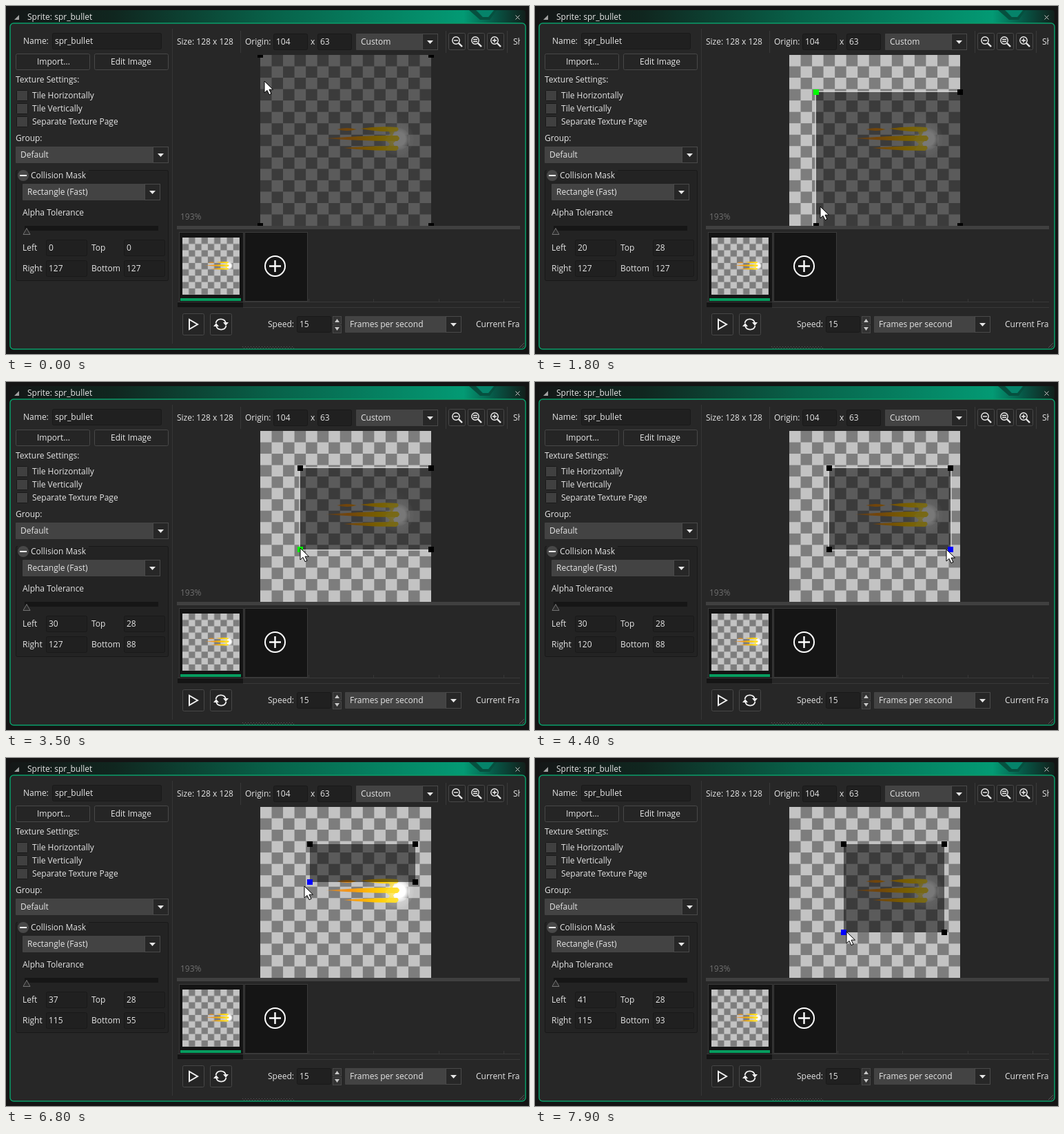
An HTML page for the animation above (8 s loop, 759x505 px).

```html
<!DOCTYPE html>
<html lang="en">
<head>
<meta charset="utf-8">
<title>Sprite editor</title>
<style>
html, body { margin: 0; width: 100%; height: 100%; overflow: hidden; background: #141414; }
svg { display: block; width: 759px; height: 505px; }
text { font: 12px "Open Sans", "Noto Sans", sans-serif; fill: #e6e6e6; white-space: pre; }
</style>
</head>
<body>
<svg id="stage" viewBox="0 0 759 505">
  <defs>
    <linearGradient id="title">
      <stop offset="0" stop-color="#141717"/><stop offset=".2" stop-color="#10261f"/>
      <stop offset=".5" stop-color="#086048"/><stop offset=".88" stop-color="#039a74"/>
      <stop offset=".94" stop-color="#075646"/><stop offset="1" stop-color="#121f1b"/>
    </linearGradient>
    <linearGradient id="flame" gradientUnits="userSpaceOnUse" x1="95" x2="205">
      <stop offset="0" stop-color="#f08a10" stop-opacity=".5"/><stop offset=".3" stop-color="#f59314"/>
      <stop offset=".7" stop-color="#ffcb00"/><stop offset="1" stop-color="#ffe640"/>
    </linearGradient>
    <radialGradient id="glow">
      <stop offset="0" stop-color="#fff" stop-opacity=".8"/><stop offset=".55" stop-color="#fff" stop-opacity=".4"/>
      <stop offset="1" stop-color="#fff" stop-opacity=".08"/>
    </radialGradient>
    <radialGradient id="head">
      <stop offset=".6" stop-color="#fff"/><stop offset="1" stop-color="#fff" stop-opacity=".2"/>
    </radialGradient>
    <pattern id="check" width="2" height="2" patternUnits="userSpaceOnUse">
      <path d="M0 0h2v2H0z" fill="#c3c3c3"/><path d="M1 0h1v1H0v1h1z" fill="#7d7d7d"/>
    </pattern>
    <pattern id="dots" x="343" y="494" width="4" height="4" patternUnits="userSpaceOnUse">
      <path d="M0 0h1v1H0zM2 2h1v1H2z" fill="#5a5a5a"/>
    </pattern>
    <clipPath id="canvasClip"><path d="M249 71h497v248H249z"/></clipPath>
    <clipPath id="imageClip"><path d="M369 71h248v248H369z"/></clipPath>
    <clipPath id="panelClip"><path d="M248 30h498v460H248z"/></clipPath>
    <g id="bullet">
      <circle cx="188" cy="120" r="34" fill="url(#glow)" opacity=".25"/>
      <circle cx="199" cy="122" r="24" fill="url(#glow)" opacity=".5"/>
      <circle cx="201" cy="122" r="16" fill="url(#head)"/>
      <path d="M111 108q14-4 29 0q-14 4-29 0zM145 107q25-4 54-2q4 4-2 6q-28 1-52-4zM95 121q50-4 104-4q6 4 0 8q-56 0-104-4zM121 135q35-3 78-3q4 4-2 7q-42 0-76-4z" fill="url(#flame)"/>
      <path d="M184 106l12 2-4 9 9 4-8 7 3 9-14 1 6-9-7-6 8-7z" fill="#ffe030" opacity=".7"/>
    </g>
  </defs>
  <g id="ui"></g>
  <g clip-path="url(#imageClip)">
    <use href="#bullet" x="369" y="71"/>
    <rect id="edge" fill="none" stroke="#d0d0d0" stroke-width="2" opacity=".7"/>
  </g>
  <g clip-path="url(#canvasClip)">
    <rect id="mask" opacity=".53"/>
    <g id="handles"></g>
  </g>
  <path id="cursor" d="M0 0v17l4-3.6 3 6.3 3-1.4-3-6.1h5.5z" fill="#fff" stroke="#000"/>
</svg>
<script>
const $ = id => document.getElementById(id);
const ui = [];
const rect = (x, y, w, h, fill, stroke = 'none', r = 0) =>
  ui.push(`<rect x="${x}" y="${y}" width="${w}" height="${h}" rx="${r}" fill="${fill}" stroke="${stroke}"/>`);
const path = (d, stroke, fill = 'none', width = 1) =>
  ui.push(`<path d="${d}" stroke="${stroke}" fill="${fill}" stroke-width="${width}"/>`);
const label = (x, y, text, id = '', fill = '#e6e6e6') =>
  ui.push(`<text x="${x}" y="${y}" id="${id}" style="fill:${fill}">${text}</text>`);
const field = (x, y, w, h, text, id) => {
  rect(x + .5, y + .5, w - 1, h - 1, '#202020', '#191919', 2);
  label(x + 4, y + h / 2 + 4, text, id);
};
const button = (x, y, w, h) => rect(x + .5, y + .5, w - 1, h - 1, '#252525', '#484848', 2);
const dropdown = (x, y, w, h, text) => {
  rect(x, y, w, h, '#434343', 'none', 1);
  rect(x + w - 22.5, y + .5, 22, h - 1, '#272727', '#4a4a4a');
  path(`M${x + w - 16} ${y + h / 2 - 2}h9l-4.5 5z`, 'none', '#e6e6e6');
  label(x + 7, y + h / 2 + 4, text);
};
// Checkerboard square with an odd number of cells per side
const checker = (x, y, size, cells) =>
  ui.push(`<rect width="${cells}" height="${cells}" fill="url(#check)" transform="translate(${x} ${y}) scale(${size / cells})"/>`);

function drawWindow() {
  rect(6, 6, 748, 20, 'url(#title)', 'none', 4);
  path('M672 6h10l10 10h8l9-10h3l-10 14H688z', 'none', '#06503f');
  path('M683 6h25l-8 10h-8z', 'none', '#05836a');
  ui.push('<rect x="6" y="25" width="748" height="473" rx="5" fill="#272727" stroke="#0a9d69" stroke-width="1.5"/>');
  path('M12 20h7v-7z', 'none', '#a0a0a0');
  label(31, 20, 'Sprite: spr_bullet');
  path('M739.5 13.5l6 6m0-6l-6 6', '#c8c8c8');
  path('M241.5 33v457', '#353535');
  rect(343, 494, 75, 4, 'url(#dots)');
  path('M745 496l7-7m-3 7l3-3', '#555');
}

function drawSettings() {
  label(25, 55, 'Name:');
  field(67, 39, 159, 24, 'spr_bullet');
  button(14, 69, 108, 24);
  label(45, 85, 'Import...');
  button(128, 69, 108, 24);
  label(152, 85, 'Edit Image');
  label(14, 111, 'Texture Settings:');
  ['Tile Horizontally', 'Tile Vertically', 'Separate Texture Page'].forEach((text, i) => {
    rect(15.5, 122.5 + 19 * i, 16, 15, '#404040', '#191919', 1);
    label(38, 134 + 19 * i, text);
  });
  label(14, 196, 'Group:');
  dropdown(14, 204, 222, 24, 'Default');
  rect(14.5, 238.5, 221, 160, '#232323', '#181818', 2);
  rect(17, 237, 103, 4, '#272727');
  ui.push('<circle cx="25" cy="246" r="8" fill="#484848"/>');
  path('M20 246h10', '#fff', 'none', 2);
  label(36, 250, 'Collision Mask');
  dropdown(24, 258, 200, 24, 'Rectangle (Fast)');
  label(24, 304, 'Alpha Tolerance');
  rect(27, 319, 194, 7, '#161616');
  path('M25 331.5l5-9 5 9z', '#747474', '#2c2c2c');
  const cell = (x, y, text, fx, id) => { label(x, y + 16, text); field(fx, y, 60, 24, '0', id); };
  cell(24, 339, 'Left', 58, 'left');
  cell(124, 339, 'Top', 171, 'top');
  cell(24, 369, 'Right', 58, 'right');
  cell(124, 369, 'Bottom', 171, 'bottom');
}

function drawToolbar() {
  label(248, 56, 'Size: 128 x 128');
  path('M340.5 36v32M638.5 36v32M727.5 36v32', '#393939');
  label(347, 56, 'Origin:');
  field(388, 40, 50, 24, '104');
  label(442, 56, 'x');
  field(452, 40, 50, 24, '63');
  dropdown(508, 40, 119, 24, 'Custom');
  const signs = ['M-3 0h6', 'M-3-1.5h6m-6 3h6', 'M-3 0h6m-3-3v6'];
  signs.forEach((sign, i) => {
    button(642 + 28 * i, 39, 25, 25);
    ui.push(`<g transform="translate(${653 + 28 * i} 50)" fill="none" stroke="#f0f0f0" stroke-width="1.4"><circle r="5.2"/><path d="${sign}"/><path d="M4 4l5 5" stroke-width="2.4"/></g>`);
  });
  ui.push('<g clip-path="url(#panelClip)">');
  label(736, 56, 'Show');
  label(682, 466, 'Current Frame');
  ui.push('</g>');
  checker(369, 71, 248, 15);
  label(253, 310, '193%', '', '#707070');
}

function drawTimeline() {
  rect(248, 319, 498, 5, '#404040');
  rect(251.5, 328.5, 93, 101, '#141414', '#3b3b3b');
  checker(256, 336, 83, 9);
  ui.push('<use href="#bullet" transform="translate(256 336) scale(.335)"/>');
  rect(253, 424, 88, 4, '#069c5e');
  rect(346.5, 328.5, 91, 100, '#151515', '#3b3b3b');
  ui.push('<circle cx="390.5" cy="377.5" r="14.5" fill="none" stroke="#fff" stroke-width="2"/>');
  path('M382 377.5h17m-8.5-8.5v17', '#fff', 'none', 2.4);
  path('M249 429.5h497M344 437.5h402M439.5 425v5M533.5 425v5M628.5 425v5M722.5 425v5', '#383838');
  rect(249, 430, 95, 7, '#151515');
  button(256, 446, 32, 32);
  path('M266 455v14l12-7z', '#f0f0f0', 'none', 2);
  button(296, 446, 32, 32);
  path('M304.500 460a7.500 7.500 0 0 1 14.500 0M319.500 464a7.500 7.500 0 0 1-14.500 0', '#f0f0f0', 'none', 1.8);
  path('M315 459h8l-4 5zM301 465h8l-4-5z', 'none', '#f0f0f0');
  label(380, 466, 'Speed:');
  field(422, 450, 50, 24, '15');
  for (const y of [450, 463]) rect(474.5, y + .5, 12, 11, '#333', '#484848');
  path('M477 459h7l-3.5-5zM477 466h7l-3.5 5z', 'none', '#c8c8c8');
  dropdown(492, 450, 169, 24, 'Frames per second');
}

drawWindow();
drawSettings();
drawToolbar();
drawTimeline();
$('ui').innerHTML = ui.join('');
$('handles').innerHTML = '<rect width="8" height="8"/>'.repeat(4);

// time, cursor x, cursor y, left, top, right, bottom
const KEYS = [
  [0, 375, 109, 0, 0, 127, 127],
  [300, 371, 74, 0, 0, 127, 127],
  [900, 390, 102, 10, 15, 127, 127],
  [1300, 408, 125, 20, 28, 127, 127],
  [1800, 414, 291, 20, 28, 127, 127],
  [2000, 409, 316, 20, 28, 127, 127],
  [2800, 418, 273, 25, 28, 127, 105],
  [3500, 427, 241, 30, 28, 127, 88],
  [3900, 620, 242, 30, 28, 127, 88],
  [4000, 615, 242, 30, 28, 127, 88],
  [4400, 597, 243, 30, 28, 120, 88],
  [4500, 592, 245, 30, 28, 115, 88],
  [4900, 520, 222, 30, 28, 115, 88],
  [5400, 428, 243, 30, 28, 115, 88],
  [5900, 430, 273, 30, 28, 115, 102],
  [6300, 440, 222, 40, 28, 115, 77],
  [6800, 433, 186, 37, 28, 115, 55],
  [7200, 432, 206, 36, 28, 115, 66],
  [7900, 452, 252, 41, 28, 115, 93]
];
// start of drag, release, handle index
const DRAGS = [[300, 1300, 0], [2000, 3500, 2], [4000, 4500, 3], [5400, 8000, 2]];

function poseAt(t) {
  const i = KEYS.findIndex(k => k[0] >= t);
  if (i < 1) return KEYS[0].slice(1);
  const [a, b] = [KEYS[i - 1], KEYS[i]];
  const f = (t - a[0]) / (b[0] - a[0]);
  return a.slice(1).map((v, n) => Math.round(v + (b[n + 1] - v) * f));
}

const setAll = (node, attrs) => { for (const k in attrs) node.setAttribute(k, attrs[k]); };

function render(t) {
  const [cx, cy, left, top, right, bottom] = poseAt(t);
  const scale = 248 / 128;
  const x0 = Math.round(369 + left * scale), x1 = Math.round(369 + (right + 1) * scale);
  const y0 = Math.round(71 + top * scale), y1 = Math.round(71 + (bottom + 1) * scale);
  const [width, height] = [x1 - x0, y1 - y0];
  setAll($('mask'), { x: x0, y: y0, width, height });
  setAll($('edge'), {
    x: x0 - 1, y: y0 - 1, width: width + 2, height: height + 2,
    visibility: t >= 300 && t < 4500 ? 'visible' : 'hidden'
  });
  const drag = DRAGS.filter(d => d[0] <= t).pop();
  [...$('handles').children].forEach((node, i) => setAll(node, {
    x: (i % 2 ? x1 : x0) - 4,
    y: (i < 2 ? y0 : y1) - 4,
    fill: !drag || drag[2] !== i ? '#000' : t < drag[1] ? '#00f' : '#0f0'
  }));
  $('cursor').setAttribute('transform', `translate(${cx} ${cy})`);
  Object.entries({ left, top, right, bottom }).forEach(([id, v]) => { $(id).textContent = v; });
}

const start = performance.now();
function tick() {
  const t = (performance.now() - start) % 8000;
  render(Math.floor(t / 100) * 100);
  requestAnimationFrame(tick);
}
tick();
</script>
</body>
</html>
```
